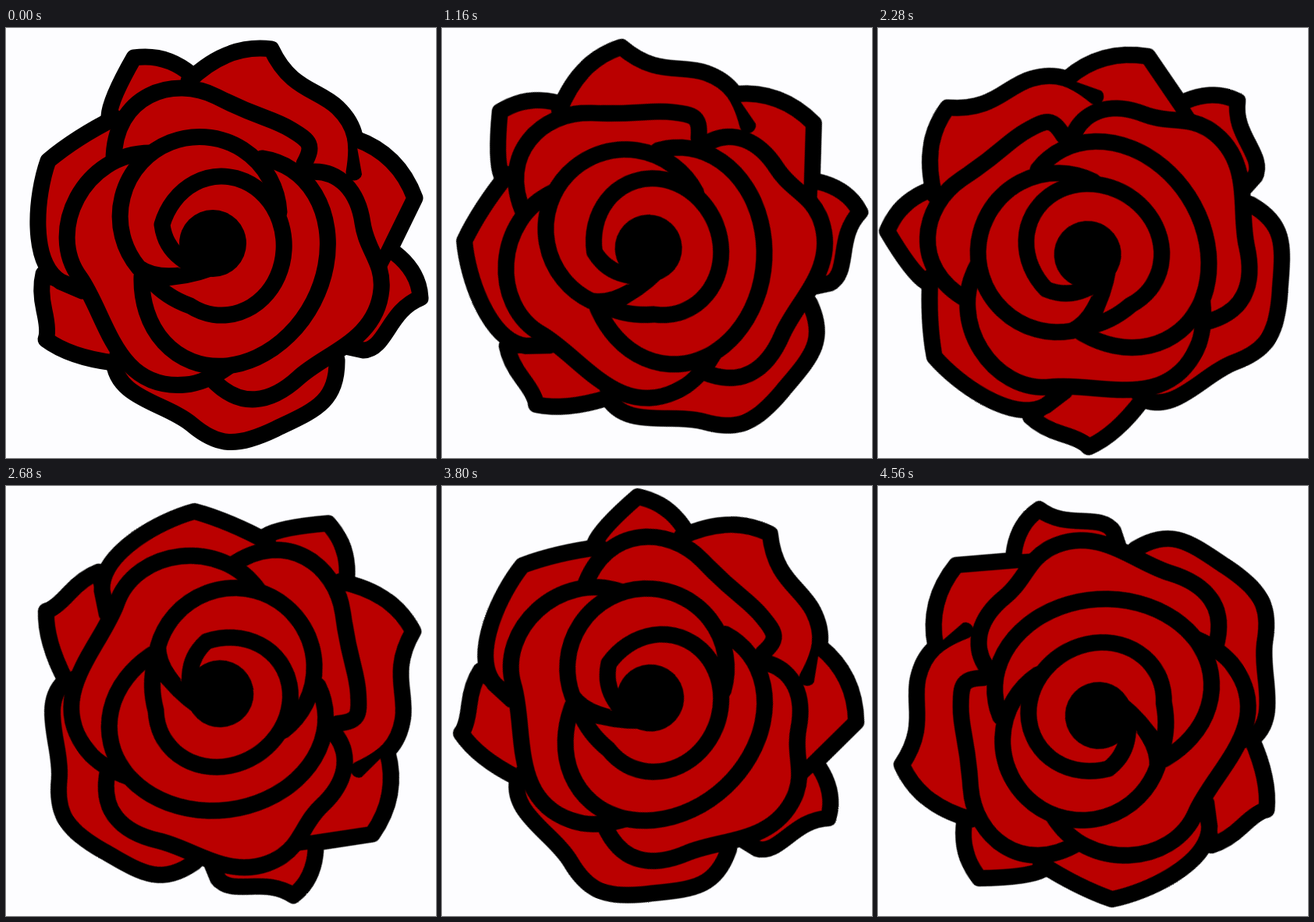
These frames come from a looping animation (551x551 px, 4600 ms). An HTML page:

```html
<!DOCTYPE html>
<html lang="en">
<head>
<meta charset="utf-8">
<title>Spinning rose</title>
<style>
  html, body { margin: 0; width: 100%; height: 100%; overflow: hidden; background: #fdfdff; }
  svg { display: block; width: 100vw; height: 100vh; }
  #rose { transform-origin: 279px 280px; fill: #ba0000; }
  path { stroke: #000; stroke-width: 21; stroke-linecap: round; stroke-linejoin: round; }
  .tail { fill: none; }
  .heart { fill: #000; }
</style>
</head>
<body>
<svg viewBox="0 0 551 551">
  <g id="rose">
    <circle cx="279" cy="280" r="205"/>

    <!-- outer petals, clockwise from the top left -->
    <path d="M200,140 L132,113 Q133,92 164,38 Q205,32 238,60"/>
    <path d="M234,68 Q283,20 340,27 C365,80 400,78 425,102 S452,150 446,185"/>
    <path d="M448,142 C485,155 510,180 524,218 L478,312"/>
    <path d="M498,288 C520,305 530,325 531,346 C490,362 487,412 458,413 L435,408"/>
    <path d="M138,425 C140,475 205,480 238,508 S295,538 345,514 S425,480 424,425"/>
    <path d="M95,333 L48,315 Q43,335 49,362 T51,399 Q82,422 138,429"/>
    <path d="M140,115 Q90,140 54,170 C38,215 30,300 70,325 L98,337"/>

    <!-- middle petals -->
    <path d="M138,170 C138,85 215,60 270,88 S340,115 365,130 S395,150 382,174"/>
    <path d="M262,448 C300,490 340,480 375,448 S475,400 481,335 C484,300 462,285 457,250 S430,175 378,186"/>
    <path d="M185,160 C100,160 50,260 95,320 C130,370 140,465 230,457 Q255,455 285,434"/>

    <!-- spiral: three arcs winding in to the heart -->
    <path d="M174,318 A139,113 -62 1 0 328,167"/>
    <path d="M245,313 Q195,325 170,307 A102,102 0 1 1 350,236"/>
    <path d="M185,322 Q205,345 236,356 A80,89 0 1 0 200,252 Q204,285 235,302"/>
    <path class="tail" d="M262,308 Q225,322 183,320"/>
    <circle class="heart" cx="265" cy="276" r="43"/>
  </g>
</svg>
<script>
const FRAMES = 115, FRAME_MS = 40, STEP_DEG = 11.572;

document.getElementById('rose').animate(
  { transform: ['rotate(0deg)', `rotate(${FRAMES * STEP_DEG}deg)`] },
  { duration: FRAMES * FRAME_MS, iterations: Infinity, easing: `steps(${FRAMES}, end)` }
);
</script>
</body>
</html>
```
